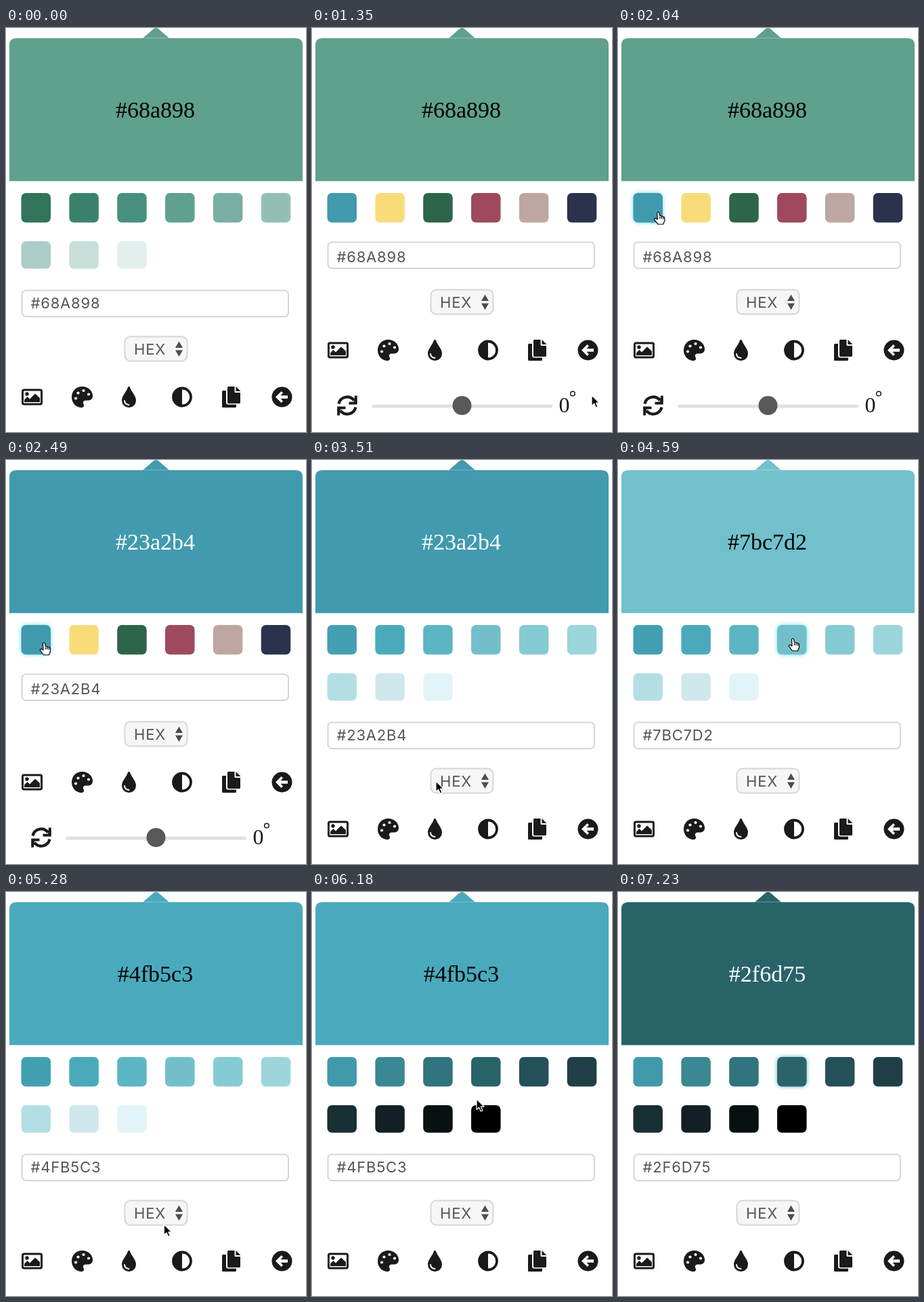
An HTML page that plays this animation: 443 px wide and 595 px high, repeating every 7320 ms.

```html
<!DOCTYPE html>
<html lang="en">
<head>
<meta charset="utf-8">
<title>Colour picker</title>
<style>
  html, body { margin: 0; width: 100%; height: 100%; overflow: hidden; background: #fff; }
  svg { display: block; width: 443px; height: 595px; }
  .code { font: 34px "Liberation Serif", Times, serif; text-anchor: middle; }
  .field { font: 22px Inter, Roboto, sans-serif; letter-spacing: .8px; fill: #565656; }
  .box { stroke: #d6d6d6; stroke-width: 2; fill: #fff; }
  .ink { fill: #1a1a1a; }
  .gap { fill: #fff; }
  .line { fill: none; stroke: #1a1a1a; }
</style>
</head>
<body>
<svg viewBox="0 0 443 595">
  <defs>
    <filter id="glow" x="-40%" y="-40%" width="180%" height="180%">
      <feDropShadow id="shade" dx="0" dy="0" stdDeviation="3.2" flood-opacity=".9"/>
    </filter>
  </defs>

  <g id="header">
    <path d="M202 15 L217 2 Q221.500 -2 226 2 L241 15Z"/>
    <path d="M5 225.500V25Q5 15 15 15H428Q438 15 438 25V225.500Z"/>
  </g>
  <path d="M203 14.700H240" stroke="#fff" stroke-opacity=".3"/>
  <text id="code" class="code" x="220.500" y="132"></text>

  <g id="swatches"></g>

  <rect id="input" class="box" x="23.500" width="393.500" height="38.500" rx="6"/>
  <text id="value" class="field" x="36.500"></text>

  <g id="controls">
    <rect class="box" x="175.500" y="454.500" width="92" height="36" rx="8" style="fill:#f6f6f6"/>
    <text class="field" x="189" y="481">HEX</text>
    <path d="M250 471L255.500 461.500L261 471ZM250 474.500L255.500 484L261 474.500Z" fill="#4c4c4c"/>

    <g transform="translate(38.500 543.500)">
      <rect class="line" x="-14" y="-10.500" width="28" height="21" rx="2" stroke-width="3"/>
      <circle class="ink" cx="-7.500" cy="-4.500" r="2.700"/>
      <path class="ink" d="M-11.500 7.500V4L-7 -.5L-3.500 3L4.500 -5L11.500 1.500V7.500Z"/>
    </g>

    <g transform="translate(112.500 543.500)">
      <path class="ink" d="M0 -15.500C9 -15.500 15.500 -9 15.500 -1.500C15.500 3 12 5 8.500 5H5C2 5 .5 8 2 10.500C3.500 13 2 15.500 -1 15.500C-9 15.500 -15.500 9 -15.500 0S-9 -15.500 0 -15.500Z"/>
      <g class="gap">
        <circle cx="-9.500" cy="2" r="2.100"/><circle cx="-6" cy="-6" r="2.100"/>
        <circle cx="2" cy="-9.500" r="2.100"/><circle cx="9.500" cy="-4" r="2.100"/>
      </g>
    </g>

    <g transform="translate(181.500 543.500)">
      <path class="ink" d="M-1.500 -14.500Q0 -16.500 1.500 -14.500C4 -7 10.500 -2 10.500 5A10.500 10.500 0 0 1 -10.500 5C-10.500 -2 -4 -7 -1.500 -14.500Z"/>
      <path d="M-6.500 5.500Q-6 11 0 11.500" fill="none" stroke="#fff" stroke-width="2" stroke-linecap="round"/>
    </g>

    <g transform="translate(260 543.500)">
      <circle class="line" r="13" stroke-width="3.800"/>
      <path class="ink" d="M0 -13A13 13 0 0 0 0 13Z"/>
    </g>

    <g transform="translate(332.500 543.500)" class="ink">
      <path d="M-12 -9.500H-7.500V8Q-7.500 11 -4.500 11H7.500V14Q7.500 15.500 6 15.500H-12Q-13.500 15.500 -13.500 14V-8Q-13.500 -9.500 -12 -9.500Z"/>
      <path d="M-4 -15.500H5V-8Q5 -6.500 6.500 -6.500H13.500V8Q13.500 9.500 12 9.500H-4Q-5.500 9.500 -5.500 8V-14Q-5.500 -15.500 -4 -15.500ZM7 -15.500L13.500 -9V-8.500H7Z"/>
    </g>

    <g transform="translate(407.500 543.500)">
      <circle class="ink" r="15"/>
      <path class="gap" d="M-9.500 0L-1 -8.500L1.500 -6L-2 -2.200H8.500V2.200H-2L1.500 6L-1 8.500Z"/>
    </g>
  </g>

  <g id="slider">
    <g transform="translate(52 556)">
      <g id="turn">
        <path class="line" d="M-12.500 -2.500A12.700 12.700 0 0 1 10 -7.500" stroke-width="4.200"/>
        <path class="ink" d="M14.800 -14.500V-1.500H2.500V-5.200L10 -5.500L11 -14.500Z"/>
      </g>
      <use href="#turn" transform="rotate(180)"/>
    </g>
    <path d="M90.500 557H352.500" stroke="#e1e1e1" stroke-width="5" stroke-linecap="round"/>
    <circle cx="221.500" cy="556" r="14" fill="#595959"/>
    <text x="364.500" y="566" font-family="'Liberation Serif', Times, serif" font-size="32" fill="#1a1a1a">0</text>
    <circle cx="385" cy="538.500" r="3.300" class="line" stroke-width="1.500"/>
  </g>

  <g id="cursor" stroke-linejoin="round">
    <path id="arrow" d="M0 0V15.500L3.700 12.200L6.300 18L9 16.800L6.400 11.200H11.200Z" fill="#000" stroke="#fff" stroke-width="1.200"/>
    <path id="hand" d="M-1.500 1Q0 -1 1.500 1L2.500 6Q4 4.800 5 6.500Q6.700 5.500 7.500 7.300Q9.500 6.800 9.500 9V13L7.500 18H-.5L-5.500 11.500Q-6 9 -3.500 9.500L-1 11Z M2.500 7V10M5 7V10M7.500 8V10.500" fill="#fff" stroke="#000" stroke-width="1.200"/>
  </g>
</svg>

<script>
const LOOP = 7320, STEP = 30, HIDE_AT = 6960;
const $ = id => document.getElementById(id);

const hex = list => list.split(' ').map(c => '#' + c);
const greens = hex('31735b 3b826d 47917e 60a08e 79afa2 94beb4 aacec7 c8dfd9 e2efec');
const theme = hex('419aae f9dc7a 2d644c 9e495d bda7a0 2b324d');
const blues = hex('43a0b3 4aaabc 5cb5c3 72bfcb 85cbd3 9cd5dc b3dfe4 cfe8ec e3f4f9');
const darks = hex('419aab 3a8893 30747f 29636a 24505a 1f3f46 182f33 122025 061110 000000');

// Each click changes the swatch set, the chosen colour, or both.
const clicks = [
  { at: 0, set: greens, code: '#68a898', fill: '#60a08e', ink: '#000' },
  { at: 1140, set: theme },
  { at: 2280, code: '#23a2b4', fill: '#419aae', ink: '#fff' },
  { at: 3240, set: blues },
  { at: 4500, code: '#7bc7d2', fill: '#72c0cc', ink: '#000' },
  { at: 4980, code: '#4fb5c3', fill: '#4aaabd', ink: '#000' },
  { at: 5610, set: darks },
  { at: 6480, code: '#2f6d75', fill: '#29636a', ink: '#fff' }
];

// Pointer stops: time, x, y
const stops = [
  [60, 340, 600], [750, 397, 560], [840, 413, 541], [1380, 413, 541],
  [1500, 385, 468], [2100, 56, 269], [2550, 56, 269], [2970, 183, 468],
  [3240, 183, 468], [3450, 183, 473], [3810, 183, 473], [4320, 258, 263],
  [4650, 258, 263], [4860, 116, 264], [5070, 116, 264], [5430, 258, 537],
  [5970, 258, 537], [6180, 243, 305], [6360, 258, 263], [LOOP, 258, 263]
];

const iconX = [38, 112, 181, 260, 332, 407];
const place = i => ({ x: 22.5 + 70.85 * (i % 6), y: i < 6 ? 243 : 314, h: i < 6 ? 43.5 : 40.5 });

const tiles = darks.map((_, i) => {
  const tile = document.createElementNS('http://www.w3.org/2000/svg', 'rect');
  const { x, y, h } = place(i);
  const attrs = { x, y, width: 43.5, height: h, rx: 7 };
  for (const name in attrs) tile.setAttribute(name, attrs[name]);
  return $('swatches').appendChild(tile);
});

function pointerAt(t) {
  const i = stops.findIndex(s => s[0] > t);
  if (i < 1) return stops[0].slice(1);
  const [t0, x0, y0] = stops[i - 1], [t1, x1, y1] = stops[i];
  const p = (t - t0) / (t1 - t0), e = p * (2 - p);
  return [x0 + (x1 - x0) * e, y0 + (y1 - y0) * e];
}

function render(t) {
  const state = Object.assign({}, ...clicks.filter(c => c.at <= t));
  const { set, code, fill, ink } = state;
  const compact = set === theme;
  const [px, py] = pointerAt(t);

  $('header').style.fill = fill;
  $('code').textContent = code;
  $('code').style.fill = ink;
  $('value').textContent = code.toUpperCase();
  $('value').setAttribute('y', compact ? 345 : 413);
  $('input').setAttribute('y', compact ? 315.5 : 386.5);
  $('controls').setAttribute('transform', `translate(0 ${compact ? -69 : 0})`);
  $('slider').style.display = compact ? '' : 'none';

  let hover = -1;
  tiles.forEach((tile, i) => {
    const { x, y, h } = place(i);
    const shown = i < set.length;
    const over = shown && px >= x && px <= x + 43.5 && py >= y && py <= y + h;
    if (over) hover = i;
    tile.style.display = shown ? '' : 'none';
    tile.style.fill = set[i] || 'none';
    tile.style.filter = over ? 'url(#glow)' : '';
  });
  $('shade').setAttribute('flood-color', set === darks ? '#4fa3ad' : '#5fd8e2');

  const iconY = compact ? 474 : 543;
  const onIcon = Math.abs(py - iconY) < 16 && iconX.some(x => Math.abs(px - x) < 15);
  const hand = hover >= 0 || onIcon;
  $('hand').style.display = hand ? '' : 'none';
  $('arrow').style.display = hand ? 'none' : '';
  $('cursor').style.display = t < stops[0][0] || t >= HIDE_AT ? 'none' : '';
  $('cursor').setAttribute('transform', `translate(${px} ${py})`);
}

const start = performance.now();
function tick() {
  const t = (performance.now() - start) % LOOP;
  render(Math.floor(t / STEP) * STEP);
  requestAnimationFrame(tick);
}
tick();
</script>
</body>
</html>
```
